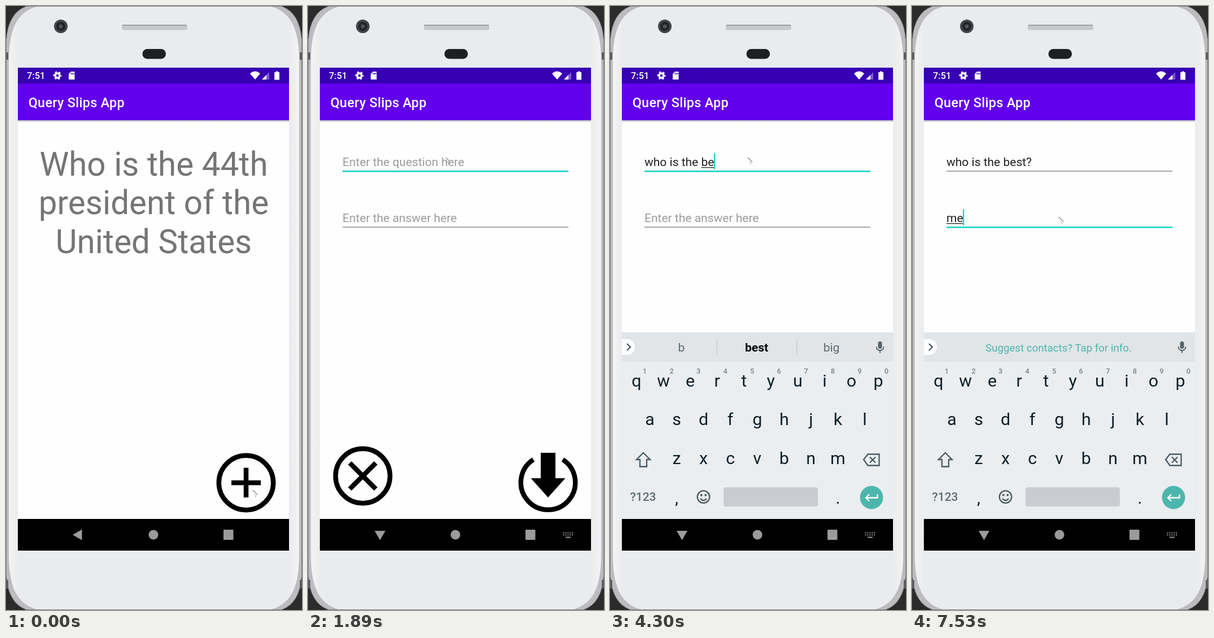
An HTML page for the animation above (8 s loop, 524 by 1068 pixels).

```html
<!DOCTYPE html>
<html lang="en">
<head>
<meta charset="utf-8">
<title>Query Slips App</title>
<style>
  html, body { margin: 0; width: 100%; height: 100%; overflow: hidden; }
  svg { display: block; width: 524px; height: 1068px; }
  text { font-family: Roboto, sans-serif; white-space: pre; }
  .mid { text-anchor: middle; }
  .title { font-size: 23.36px; font-weight: 500; letter-spacing: .3px; fill: #fff; }
  .big { font-size: 58.4px; fill: #757575; }
  .field { font-size: 21px; fill: #212121; }
  .hint { font-size: 21px; fill: #9b9b9b; }
  .key { font-size: 30.4px; fill: #0e1f28; }
  .digit { font-size: 12.8px; font-weight: 500; fill: #78848a; }
  .word { font-size: 21px; fill: #5c6a70; }
  .icon { fill: none; stroke: #4b5a61; stroke-width: 2.3; }
  .bold { fill: none; stroke: #000; stroke-width: 8.5; }
</style>
</head>
<body>
<svg viewBox="0 0 524 1068">
  <defs>
    <clipPath id="screen"><rect x="21" y="109" width="480" height="854"/></clipPath>
    <clipPath id="reveal"><rect id="revealBox" x="21" width="480" height="900"/></clipPath>
    <linearGradient id="face">
      <stop offset="0" stop-color="#f4f3f4"/><stop offset=".035" stop-color="#e9ebed"/>
      <stop offset=".965" stop-color="#e9ebed"/><stop offset="1" stop-color="#f4f3f4"/>
    </linearGradient>
    <linearGradient id="shade" x2="0" y2="1">
      <stop offset="0" stop-color="#b9b9b9"/><stop offset="1" stop-color="#fefefe"/>
    </linearGradient>
    <g id="window">
      <path fill="#000" d="M21 109H501V963H21z"/>
      <path fill="#fefefe" d="M21 202H501V907H21z"/>
      <path fill="#3700b3" d="M21 109H501V137H21z"/>
      <path fill="#6200ee" d="M21 137H501V202H21z"/>
      <path fill="url(#shade)" d="M21 202H501V206H21z"/>
      <text class="title" x="39.7" y="179">Query Slips App</text>
    </g>
  </defs>

  <!-- phone body -->
  <path fill="#2b2b2c" d="M0 0H524V1068H0z"/>
  <path fill="#bcbcbe" stroke="#77777a" d="M.5 60Q4 12 36 .5H488Q520 12 523.5 60V1008Q520 1056 488 1067.5H36Q4 1056 .5 1008z"/>
  <path fill="#5c5c5e" d="M0 82H4V95H0zM520 82H524V95H520zM0 1015H4V1030H0zM520 1015H524V1030H520z"/>
  <path fill="url(#face)" d="M5 100C5 42 18 12 54 1H470C506 12 519 42 519 100V968C519 1026 506 1056 470 1067H54C18 1056 5 1026 5 968z"/>
  <circle cx="97" cy="36" r="12" fill="#424549"/>
  <circle cx="97" cy="36" r="8" fill="#222428"/>
  <circle cx="97" cy="36" r="3.5" fill="#51565c"/>
  <rect x="205" y="33" width="116" height="9.5" rx="3" fill="#c6c8ca"/>
  <path stroke="#909295" stroke-width="1.5" d="M206 34H320"/>
  <rect x="241.5" y="76" width="41.5" height="17.5" rx="8.5" fill="#1d1f23"/>

  <g clip-path="url(#screen)">
    <path d="M21 109H501V963H21z"/>
    <g id="home">
      <use href="#window"/>
      <g class="big mid">
        <text x="261.5" y="299.5">Who is the 44th</text>
        <text x="261.5" y="368">president of the</text>
        <text x="261.5" y="436.5">United States</text>
      </g>
      <g class="bold">
        <circle cx="425" cy="843" r="48.2"/>
        <path d="M399 843H451M425 816.5V869"/>
      </g>
    </g>

    <g clip-path="url(#reveal)"><g id="editor">
      <use href="#window"/>
      <g id="fields"></g>
      <g class="bold">
        <circle cx="97" cy="831" r="48.2"/>
        <path d="M74 808L120 854M120 808L74 854M399 802A48.2 48.2 0 1 0 451 802"/>
      </g>
      <path d="M412 790H438V835H455.5L425 869L394.5 835H412z"/>
    </g></g>

    <g id="keyboard">
      <path fill="#eaeef1" d="M21 577H501V907H21z"/>
      <path fill="#e1e5e8" d="M21 577H501V629H21z"/>
      <path d="M21 907H501V963H21z"/>
      <path fill="#fff" d="M21 589H30A14 14 0 0 1 30 617H21z"/>
      <path class="icon" d="M30 597L36 603L30 609"/>
      <rect x="474.5" y="593" width="7" height="13" rx="3.5" fill="#56646b"/>
      <path class="icon" style="stroke-width:1.8" d="M471.5 602.5A6.5 6.5 0 0 0 484.5 602.5M478 609V613.5"/>
      <text id="notice" class="mid" x="259.5" y="610.5" font-size="18.69" fill="#4db6ac">Suggest contacts? Tap for info.</text>
      <g id="words">
        <path stroke="#c0c6c9" d="M189.5 589V617M330.5 589V617"/>
        <text class="word mid" x="126.5" y="611"></text>
        <text class="word mid" x="259.5" y="611"></text>
        <text class="word mid" x="392" y="611"></text>
      </g>
      <g id="keys"></g>
      <g class="icon">
        <path d="M59 790L71 802H65V814.5H53V802H47z"/>
        <path d="M449 802L456.5 792.5H476.5V812.5H456.5zM460 797.5L470 807.5M470 797.5L460 807.5"/>
        <circle cx="165.5" cy="868" r="10.8"/>
        <path d="M160 871Q165.5 877.5 171 871"/>
      </g>
      <path fill="#4b5a61" d="M160 863h3.4v3.4h-3.4zM167.6 863h3.4v3.4h-3.4z"/>
      <text class="word mid" x="58.5" y="875" font-weight="500">?123</text>
      <rect x="201" y="851" width="167" height="34" rx="4" fill="#c9cdd1"/>
      <circle cx="463" cy="869" r="20.5" fill="#4db6ac"/>
      <path fill="none" stroke="#fff" stroke-width="2.3" d="M473.5 863.5V869.5H453.5M459 863.5L453 869.5L459 875.5"/>
    </g>

    <!-- system bars -->
    <g fill="#fff">
      <text x="37" y="129.3" font-size="16.4" font-weight="500">7:51</text>
      <circle cx="91" cy="123" r="4" fill="none" stroke="#fff" stroke-width="3.6"/>
      <circle cx="91" cy="123" r="6.3" fill="none" stroke="#fff" stroke-width="2.4" stroke-dasharray="3.3" stroke-dashoffset="1.65"/>
      <path d="M115 116H121.5V130H111V120z"/>
      <path d="M432 119.5Q441 111.5 450 119.5L441 130z"/>
      <path fill-opacity=".35" d="M453 130H466V117z"/>
      <path d="M453 130H461V122zM477.8 115.5H481.4V117H484V130.5H475.2V117H477.8z"/>
    </g>
    <path fill="#3700b3" d="M114.6 118h1.3v3h-1.3zM116.9 118h1.3v3h-1.3zM119.2 118h1.3v3h-1.3z"/>
    <g fill="#9b9b9b">
      <path id="back" d="M118 935L134.5 925.5V944.5z"/>
      <circle cx="261" cy="935" r="8.5"/>
      <rect x="385" y="926" width="17.5" height="18" rx="1"/>
      <path id="imeIcon" fill="none" stroke="#9b9b9b" stroke-width="2" d="M456 939.5H465"/>
      <path id="imeDots" stroke="#9b9b9b" stroke-width="2" stroke-dasharray="2 1.9" d="M451.5 931.5H469.5M451.5 935.3H469.5"/>
    </g>
    <g id="mouse" fill="none">
      <path stroke="#fff" stroke-width="2.4" d="M0 0L8 8"/>
      <path stroke="#333" d="M0 0L8 8"/>
      <path stroke="#888" stroke-dasharray="1.4 1" d="M2 7L6 11M4.5 7.5L6.5 9.5M4 12L6 12"/>
    </g>
  </g>
</svg>

<script>
const LOOP = 8000;
const $ = id => document.getElementById(id);
const svgNS = 'http://www.w3.org/2000/svg';

// Each track is a list of [time, ...values], held until the next entry.
const tracks = {
  open: [[0, 0], [120, .43], [240, .85], [360, 1]],
  mouse: [[0, 437, 856], [360, 420, 790], [510, 330, 520], [660, 245, 253], [780, 245, 262],
    [900, 244, 268], [6210, 244, 330], [6360, 244, 397], [6640, 260, 373]],
  question: [[0, 0], [2320, 1], [2470, 3], [2590, 4], [3120, 5], [3270, 6], [3400, 7], [3530, 8],
    [3680, 9], [3850, 10], [4060, 11], [4180, 12], [4300, 13], [4450, 14], [4570, 15], [5650, 16]],
  answer: [[0, 0], [7380, 1], [7530, 2]],
  questionFocus: [[0, 0], [1180, .5], [1330, 1], [6640, .5], [6790, 0]],
  answerFocus: [[0, 0], [6640, .5], [6790, 1]],
  caret: [[0, ''], [1330, 'question'], [1740, ''], [2200, 'question'], [5120, ''],
    [5650, 'question'], [6060, ''], [6640, 'answer'], [7100, ''], [7380, 'answer']],
  keyboard: [[0, 400, 0], [2200, 45, .4], [2320, 9, .85], [2470, 1, .98], [2590, 0, 1]],
  nav: [[0, 0], [1740, .5], [1890, 1]],
  words: [[0, ''], [3120, 'i is it'], [3400, 'the your this'], [3530, 't the this'],
    [3680, 'th the things'], [4060, 'most best person'], [4300, 'b best big'],
    [4450, 'be best better'], [4720, 'beat best bestest'], [5650, 'thanks I we'], [6640, '']]
};
const at = (name, t) => tracks[name].findLast(step => step[0] <= t).slice(1);

function add(parent, tag, attrs, content = '') {
  const node = document.createElementNS(svgNS, tag);
  for (const k in attrs) node.setAttribute(k, attrs[k]);
  node.textContent = content;
  return parent.appendChild(node);
}

function makeField(name, full, hint, y) {
  const g = $('fields');
  const line = { x: 61, width: 400 };
  const hintText = add(g, 'text', { class: 'hint', x: 61, y }, hint);
  const text = add(g, 'text', { class: 'field', x: 61, y });
  const composing = add(g, 'rect', { y: y + 2, height: 1.3, fill: '#212121' });
  add(g, 'rect', { ...line, y: y + 8.4, height: 1.2, fill: '#757575' });
  const accent = add(g, 'rect', { ...line, y: y + 8.3, height: 2.3, fill: '#03dac5' });
  const caret = add(g, 'rect', { y: y - 22.5, width: 2.2, height: 28.5, fill: '#03dac5' });
  return t => {
    const value = full.slice(0, at(name, t)[0]);
    const start = value.search(/\w*$/);
    text.textContent = value;
    const end = value ? text.getComputedTextLength() : 0;
    const from = start ? text.getSubStringLength(0, start) : 0;
    composing.setAttribute('x', 61 + from);
    composing.setAttribute('width', Math.max(0, end - from));
    hintText.style.opacity = value ? 0 : 1;
    accent.style.opacity = at(name + 'Focus', t)[0];
    caret.setAttribute('x', 60.5 + end);
    caret.style.opacity = at('caret', t)[0] === name ? 1 : 0;
  };
}

const fields = [
  makeField('question', 'who is the best?', 'Enter the question here', 283),
  makeField('answer', 'me', 'Enter the answer here', 382)
];

[['qwertyuiop', 47, 672.5], ['asdfghjkl', 70.5, 741], ['zxcvbnm', 118, 809.5]].forEach(([row, x0, y]) =>
  [...row].forEach((letter, i) =>
    add($('keys'), 'text', { class: 'key mid', x: x0 + i * 47.55, y }, letter)));
[...'1234567890'].forEach((digit, i) =>
  add($('keys'), 'text', { class: 'digit mid', x: 61.5 + i * 47.55, y: 650 }, digit));
add($('keys'), 'text', { class: 'key mid', x: 118, y: 879.5 }, ',');
add($('keys'), 'text', { class: 'key mid', x: 403.5, y: 879.5 }, '.');

const move = (id, x, y) => $(id).setAttribute('transform', `translate(${x} ${y})`);

function draw(t) {
  const [open] = at('open', t);
  move('home', 0, -17 * open);
  $('home').style.opacity = 1 - .1 * open;
  move('editor', 0, 35 * (1 - open));
  $('editor').style.display = open ? '' : 'none';
  $('revealBox').setAttribute('y', 109 + 854 * (1 - open));
  fields.forEach(update => update(t));

  const [drop, alpha] = at('keyboard', t);
  move('keyboard', 0, drop);
  $('keyboard').style.opacity = alpha;

  const [words] = at('words', t);
  $('notice').style.display = words ? 'none' : '';
  $('words').style.display = words ? '' : 'none';
  const slots = $('words').querySelectorAll('text');
  words.split(' ').forEach((word, i) => slots[i].textContent = word);
  const composing = t < 5650;
  slots[1].style.fontWeight = composing ? 700 : 400;
  slots[1].style.fill = composing ? '#000' : '';

  const [nav] = at('nav', t);
  $('back').setAttribute('transform', `rotate(${-90 * nav} 127.5 935)`);
  $('imeIcon').style.opacity = $('imeDots').style.opacity = nav;
  move('mouse', ...at('mouse', t));
}

function tick(now) {
  draw(now % LOOP);
  requestAnimationFrame(tick);
}
draw(0);
requestAnimationFrame(tick);
</script>
</body>
</html>
```
